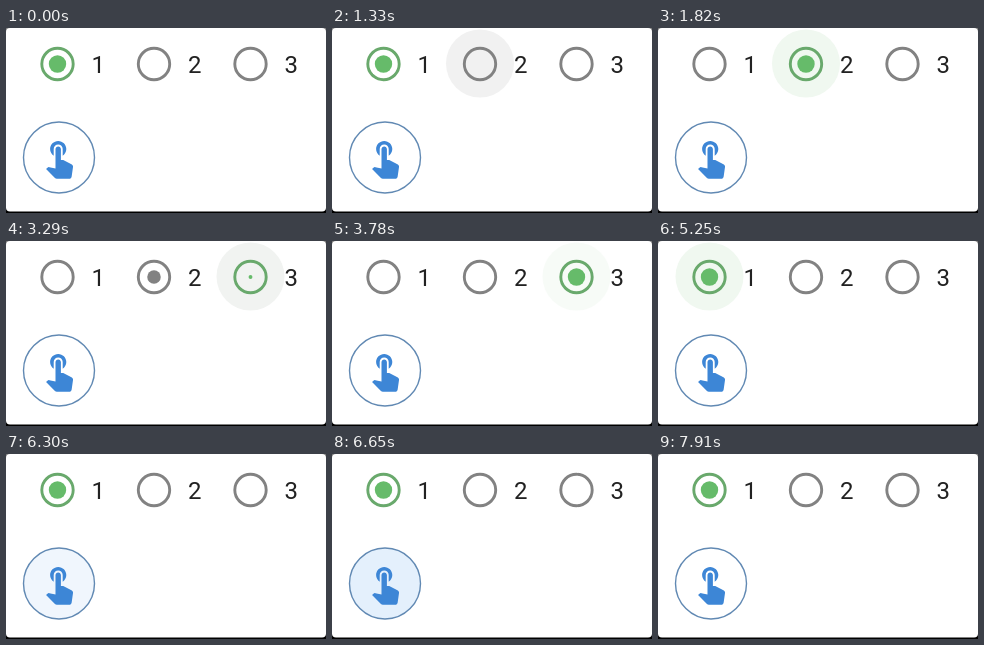
An HTML page that plays this animation: 320 px wide and 185 px high, repeating every 8.12 s.

```html
<!DOCTYPE html>
<html lang="en">
<head>
<meta charset="utf-8">
<title>Radio buttons</title>
<style>
  html, body { margin: 0; width: 100%; height: 100%; overflow: hidden; background: #000; }
  svg { display: block; width: 100vw; height: 100vh; }
  text { font: 24px Roboto, Arial, sans-serif; fill: #222; }
</style>
</head>
<body>
<svg id="stage" viewBox="0 0 320 185">
  <rect width="320" height="20" fill="#777"/>
  <rect width="320" height="183.6" rx="4" fill="#fff"/>
  <g id="radios"></g>
  <circle id="button" cx="53" cy="129.5" r="35.5" stroke="#6189b3" stroke-width="1.4"/>
  <path fill="#3d86d6" transform="translate(31.5 107.6) scale(1.8)" d="M9 11.24V7.5C9 6.12 10.12 5 11.5 5S14 6.12 14 7.5v3.74c1.21-.81 2-2.18 2-3.74C16 5.01 13.99 3 11.5 3S7 5.01 7 7.5c0 1.56.79 2.93 2 3.74zm9.84 4.63l-4.54-2.26c-.17-.07-.35-.11-.54-.11H13v-6c0-.83-.67-1.5-1.5-1.5S10 6.67 10 7.5v10.74l-3.43-.72c-.08-.01-.15-.03-.24-.03-.31 0-.59.13-.79.33l-.79.8 4.94 4.94c.27.27.65.44 1.06.44h6.79c.75 0 1.33-.55 1.44-1.28l.75-5.27c.01-.07.02-.14.02-.2 0-.62-.38-1.16-.91-1.38z"/>
</svg>
<script>
const LOOP = 8120, STEP = 70;
const GREY = '#828282', GREEN = '#66bb6a', RING = '#69a96c';

// Times in ms: pointer enters, click selects, pointer leaves, selection moves on
const radios = [
  { x: 51.5, enter: 4150, on: 5024, leave: 5410, fade: 380, off: 1526 },
  { x: 148, enter: 1140, on: 1526, leave: 2050, fade: 180, off: 3274 },
  { x: 244.5, enter: 2330, on: 3274, leave: 3660, fade: 240, off: 5024 }
];

const ramp = (t, start, length) => Math.min(1, Math.max(0, (t - start) / length));
const mix = (a, b, k) => `rgb(${a.map((v, i) => Math.round(v + (b[i] - v) * k))})`;

// cubic-bezier(0, 0, .2, 1)
function decelerate(x) {
  let lo = 0, hi = 1;
  for (let i = 0; i < 20; i++) {
    const s = (lo + hi) / 2;
    if (.6 * s * s * (1 - s) + s ** 3 < x) lo = s; else hi = s;
  }
  return lo * lo * (3 - 2 * lo);
}

function add(name, attrs) {
  const el = document.createElementNS('http://www.w3.org/2000/svg', name);
  for (const key in attrs) el.setAttribute(key, attrs[key]);
  return document.getElementById('radios').appendChild(el);
}

radios.forEach((r, i) => {
  r.halo = add('circle', { cx: r.x, cy: 35.5, r: 34 });
  r.ring = add('circle', { cx: r.x, cy: 36, r: 15.7, fill: 'none', 'stroke-width': 2.9 });
  r.dot = add('circle', { cx: r.x, cy: 36 });
  add('text', { x: r.x + 34, y: 45 }).textContent = i + 1;
});
const button = document.getElementById('button');

function draw(t) {
  for (const r of radios) {
    const checked = r.on < r.off ? t >= r.on && t < r.off : t >= r.on || t < r.off;
    const grow = decelerate(ramp(t, checked ? (t < r.on ? -LOOP : r.on) : r.off, 240));
    r.ring.setAttribute('stroke', checked ? RING : GREY);
    r.dot.setAttribute('fill', checked ? GREEN : GREY);
    // A cleared radio that has not been chosen yet this loop stays empty
    const size = checked ? grow : t >= r.off ? 1 - grow : 0;
    r.dot.setAttribute('r', 8.7 * size);
    r.halo.setAttribute('fill', mix([241, 241, 241], [240, 248, 240], ramp(t, r.on - 40, 160)));
    r.halo.setAttribute('opacity', ramp(t, r.enter, 180) * (1 - ramp(t, r.leave, r.fade)));
  }
  const hover = ramp(t, 6200, 140) * .8 + ramp(t, 6540, 100) * .2;
  const level = hover * (1 - ramp(t, 6660, 470));
  button.setAttribute('fill', mix([255, 255, 255], [228, 240, 252], level));
}

function frame() {
  draw(Math.floor(performance.now() % LOOP / STEP) * STEP);
  requestAnimationFrame(frame);
}
frame();
</script>
</body>
</html>
```
